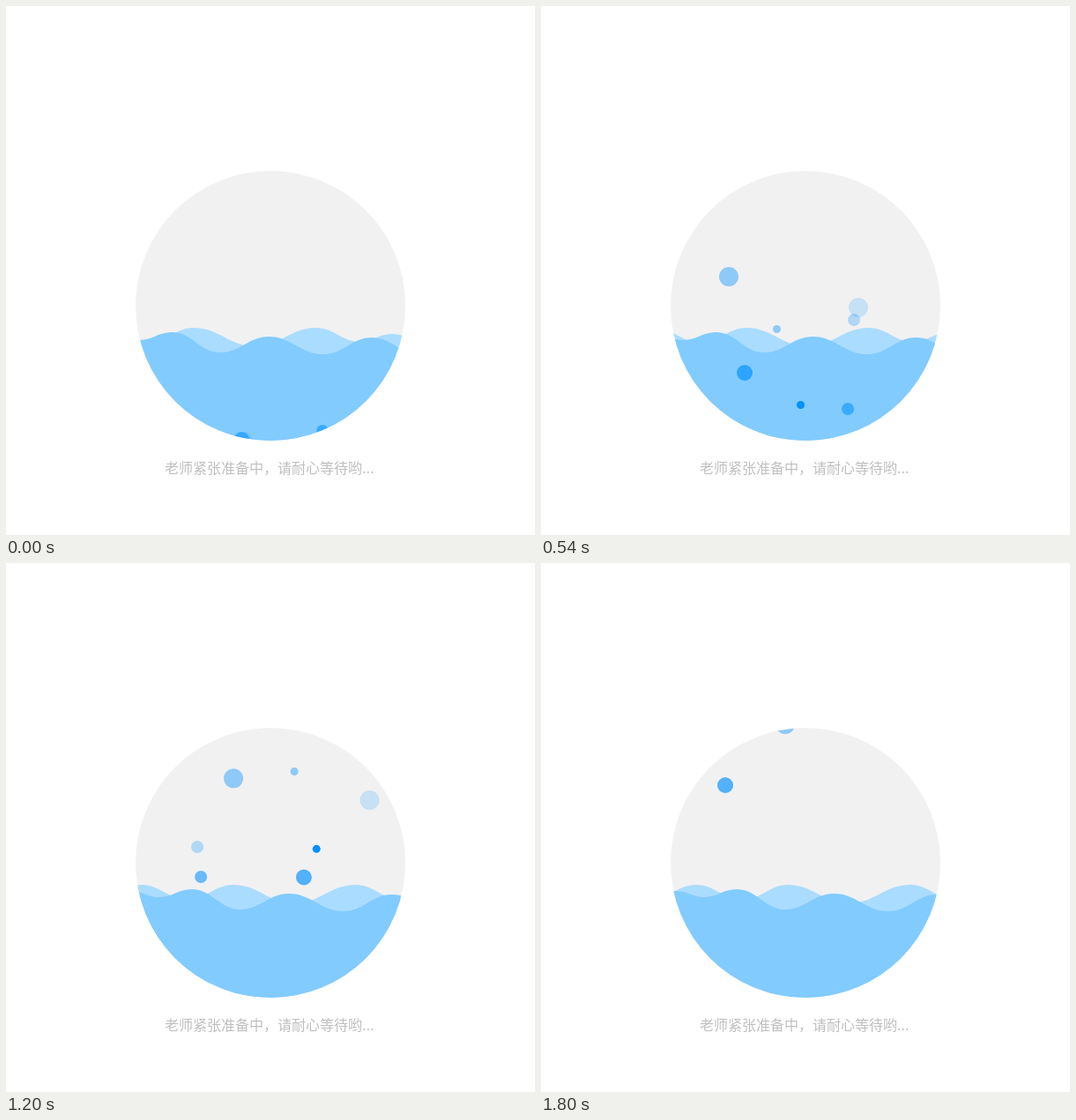
Animation, 600 px wide and 600 px high, one loop 1.83 s. Source, as an HTML page:

```html
<!DOCTYPE html>
<html lang="zh-CN">
<head>
<meta charset="utf-8">
<style>
html, body { margin: 0; width: 100%; height: 100%; overflow: hidden; background: #fff; }
svg { display: block; width: 600px; height: 600px; }
text { font: 16px "Noto Sans CJK SC", "Noto Sans CJK", sans-serif; fill: #bfbfbf; }
</style>
</head>
<body>
<svg viewBox="0 0 600 600">
  <clipPath id="bowl"><circle cx="300" cy="340" r="153"/></clipPath>
  <circle cx="300" cy="340" r="153" fill="#f1f1f1"/>
  <g clip-path="url(#bowl)">
    <path id="back" fill="#aadcff"/>
    <path id="front" fill="#82cbff"/>
    <g id="bubbles" fill="#0090ff"></g>
  </g>
  <text x="180" y="530">老师紧张准备中，请耐心等待哟...</text>
</svg>
<script>
const LOOP = 1830, STEP = 30;
const $ = id => document.getElementById(id);

// Alternating crests and troughs joined by smooth curves
function wave(points) {
  const [x0, y0] = points[0];
  let d = `M${x0} 600V${y0}`;
  for (let i = 1; i < points.length; i++) {
    const [px, py] = points[i - 1], [x, y] = points[i], h = (x - px) * 0.42;
    d += `C${px + h} ${py} ${x - h} ${y} ${x} ${y}`;
  }
  return d + 'V600Z';
}

$('back').setAttribute('d', wave([[56, 382], [109, 365], [161, 382], [213, 365],
  [282, 386], [351.5, 365], [402, 381], [437, 372], [480, 382]]));
$('front').setAttribute('d', wave([[80, 392], [119, 372], [151, 379], [188, 370],
  [243, 393], [298, 375], [360, 395], [415, 376], [472, 397]]));

// Key times of the bubble paths
const TIMES = [0, 180, 540, 750, 990, 1380, 1800];
const BUBBLES = [
  { r: 9, a: .5, path: [[267, 492], [255, 520]] },
  { r: 11, a: .18, path: [[269, 494], [274, 418], [360, 342], [378, 300], [398, 279], [426, 260], [470, 225]] },
  { r: 11, a: .41, path: [[168, 445], [185, 397], [213, 307], [230, 285], [249, 265], [264, 226], [277, 183]] },
  { r: 4.5, a: .41, path: [[345, 520], [319.5, 474.5], [267.5, 366.5], [281.5, 324.5], [306.5, 264.5], [344.5, 216.5], [385, 165]] },
  { r: 7, a: .27, path: [[463, 334], [415, 343], [355, 356], [305, 347], [248, 326], [193, 321], [130, 316]] },
  { r: 7, a: .56, path: [[359, 482], [359, 482], [348, 457], [314, 437], [260, 403], [189, 313], [112, 216]] },
  { r: 9, a: .66, path: [[130, 428], [172, 425], [231, 416], [295, 406], [345, 383], [314, 330], [209, 252]] },
  { r: 4.5, a: 1, path: [[345, 530], [322, 500], [294.5, 452.5], [278, 408.5], [305.5, 357.5], [394.5, 298.5], [480, 240]] }
];

for (const b of BUBBLES) {
  b.el = document.createElementNS('http://www.w3.org/2000/svg', 'circle');
  b.el.setAttribute('r', b.r);
  b.el.setAttribute('opacity', b.a);
  $('bubbles').append(b.el);
}

// Hermite spline through unevenly timed points
function along(path, axis, t) {
  const last = path.length - 1;
  const value = i => path[i][axis];
  if (t >= TIMES[last]) return value(last);
  const slope = i => {
    const a = Math.max(i - 1, 0), b = Math.min(i + 1, last);
    return (value(b) - value(a)) / (TIMES[b] - TIMES[a]);
  };
  let i = 0;
  while (t >= TIMES[i + 1]) i++;
  const span = TIMES[i + 1] - TIMES[i], u = (t - TIMES[i]) / span, v = 1 - u;
  return v * v * ((1 + 2 * u) * value(i) + u * span * slope(i))
       + u * u * ((3 - 2 * u) * value(i + 1) - v * span * slope(i + 1));
}

function draw(now) {
  const t = Math.floor(now % LOOP / STEP) * STEP;
  $('back').setAttribute('transform', `translate(${t * 0.0373})`);
  $('front').setAttribute('transform', `translate(${t * 0.0189})`);
  for (const b of BUBBLES) {
    b.el.setAttribute('cx', along(b.path, 0, t));
    b.el.setAttribute('cy', along(b.path, 1, t));
  }
}

const start = performance.now();
function tick() {
  draw(performance.now() - start);
  requestAnimationFrame(tick);
}
tick();
</script>
</body>
</html>
```
